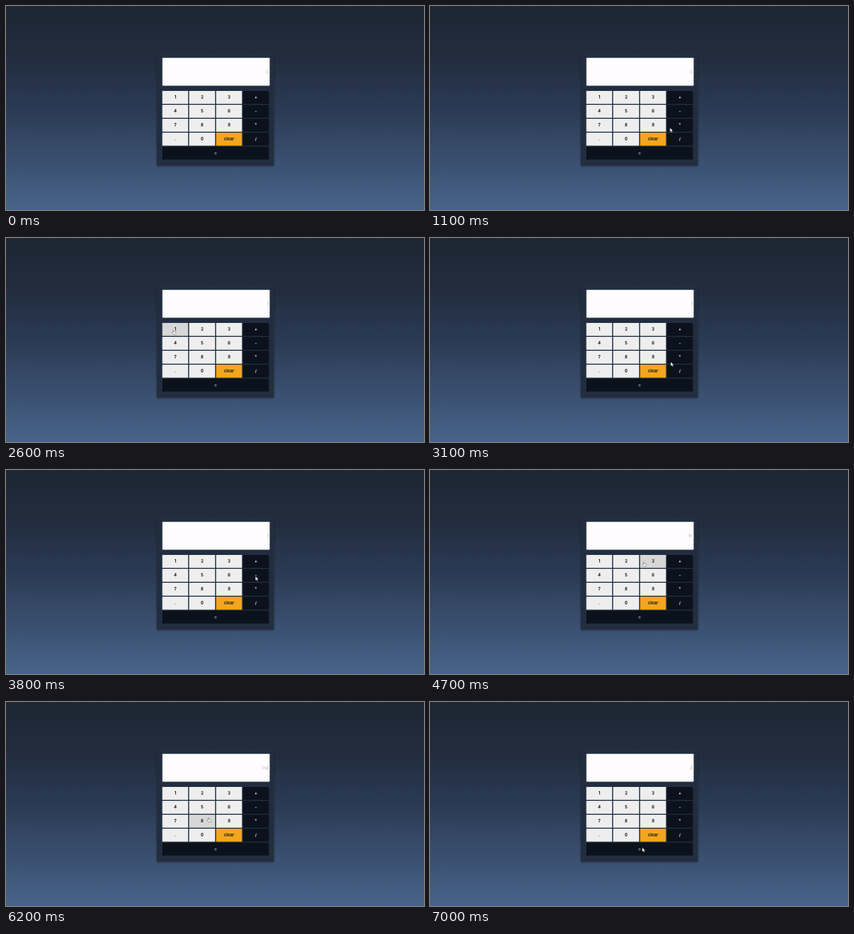
Write an HTML page that moves like this. It is 600x293 px and loops after 8 s.

```html
<!DOCTYPE html>
<html lang="en">
<head>
<meta charset="utf-8">
<title>Calculator</title>
<style>
  html, body { margin: 0; width: 100%; height: 100%; overflow: hidden; background: #1d2632; }
  svg { display: block; width: 100vw; height: 100vh; }
  text { font-family: Inter, "Open Sans", sans-serif; }
  .key { font-size: 6px; font-weight: 700; text-anchor: middle; }
  #out { font-size: 5.7px; font-weight: 300; text-anchor: end; }
</style>
</head>
<body>
<svg viewBox="0 0 600 293" preserveAspectRatio="none">
  <defs>
    <linearGradient id="sky" x1="0" y1="0" x2="0" y2="1">
      <stop offset="0" stop-color="#1d2632"/>
      <stop offset=".25" stop-color="#212d3e"/>
      <stop offset=".5" stop-color="#2b3a54"/>
      <stop offset="1" stop-color="#486389"/>
    </linearGradient>
    <filter id="shade" x="-10%" y="-10%" width="120%" height="120%">
      <feDropShadow dx="0" dy="1" stdDeviation="1.3" flood-color="#0b111a" flood-opacity=".6"/>
    </filter>
  </defs>
  <rect width="600" height="293" fill="url(#sky)"/>
  <rect x="216.5" y="67" width="168" height="162" rx="1" fill="#202e41" filter="url(#shade)"/>
  <rect x="224.5" y="74.5" width="154" height="40" fill="#fffdff"/>
  <text id="out" x="376.7" y="96.8"></text>
  <g id="keys"></g>
  <g id="cursor" stroke-linejoin="round">
    <path id="arrow" d="M0 0V6L1.5 4.8L2.5 7L3.6 6.5L2.6 4.4H4.5Z" fill="#fff" stroke="#111820" stroke-width=".4"/>
    <path id="hand" d="M.2 .4Q.8 -.3 1.3 .4V2.4L3.9 3Q4.5 3.2 4.4 4L4 6.4H1.2L-.9 3.9Q-.9 3 .2 3.6Z" fill="#fff" stroke="#555" stroke-width=".55"/>
  </g>
</svg>
<script>
const $ = id => document.getElementById(id);
const LOOP = 8000, STEP = 100;
const rows = [["1", "2", "3", "+"], ["4", "5", "6", "-"], ["7", "8", "9", "*"], [".", "0", "clear", "/"]];
const keys = [];

function add(tag, attrs) {
  const el = document.createElementNS("http://www.w3.org/2000/svg", tag);
  for (const k in attrs) el.setAttribute(k, attrs[k]);
  return $("keys").appendChild(el);
}

function addKey(label, x, y, w, fill, ink) {
  const h = 18.6;
  const rect = add("rect", { x, y, width: w, height: h, fill });
  const cap = add("text", { class: "key", x: x + w / 2, y: y + 11.4, fill: ink });
  cap.textContent = label;
  keys.push({ rect, x, y, w, h, fill });
}

rows.forEach((row, r) => row.forEach((label, c) => {
  const dark = c === 3;
  const fill = dark ? "#0c121b" : label === "clear" ? "#f3a620" : "#eeeeef";
  addKey(label, 224.4 + c * 38.6, 122 + r * 20, 37.1, fill, dark ? "#e8eaee" : "#1b1b1b");
}));
addKey("=", 224.4, 202, 152.9, "#0c121b", "#b4b7bd");

// time, x, y
const path = [
  [1000, 353, 188], [1400, 318.5, 135.5], [1800, 277, 132], [2000, 239.5, 132.5],
  [2800, 239.5, 132.5], [2900, 258, 140], [3100, 345.5, 178], [3700, 357, 164],
  [4000, 360, 130], [4600, 360, 130], [4700, 306, 132], [5300, 279, 134],
  [5900, 279, 134], [6600, 304.5, 209]
];
const shown = [[7000, "3"], [5700, "1+2"], [4400, "1+"], [2600, "1"], [0, "0"]];

function place(t) {
  const i = path.findIndex(p => p[0] > t);
  if (i < 0) return path[path.length - 1].slice(1);
  const a = path[i - 1], b = path[i];
  const u = (t - a[0]) / (b[0] - a[0]);
  return [a[1] + (b[1] - a[1]) * u, a[2] + (b[2] - a[2]) * u];
}

function draw(time) {
  const t = Math.floor((time % LOOP) / STEP) * STEP;
  const text = shown.find(s => t >= s[0])[1];
  $("out").textContent = text;
  $("out").setAttribute("fill", text === "0" ? "#a5a5a8" : "#77777b");

  const on = t >= path[0][0];
  const [x, y] = on ? place(t) : [-20, -20];
  $("cursor").setAttribute("transform", `translate(${x} ${y})`);
  let light = false;
  for (const k of keys) {
    const over = x >= k.x && x < k.x + k.w && y >= k.y && y < k.y + k.h;
    const pale = k.fill === "#eeeeef";
    if (over && k.fill !== "#0c121b") light = true;
    k.rect.setAttribute("fill", over && pale ? "#d7d7d8" : k.fill);
  }
  $("cursor").setAttribute("visibility", on ? "visible" : "hidden");
  $("hand").setAttribute("display", light ? "inline" : "none");
  $("arrow").setAttribute("display", light ? "none" : "inline");
}

const start = performance.now();
function tick() {
  draw(performance.now() - start);
  requestAnimationFrame(tick);
}
tick();
</script>
</body>
</html>
```
